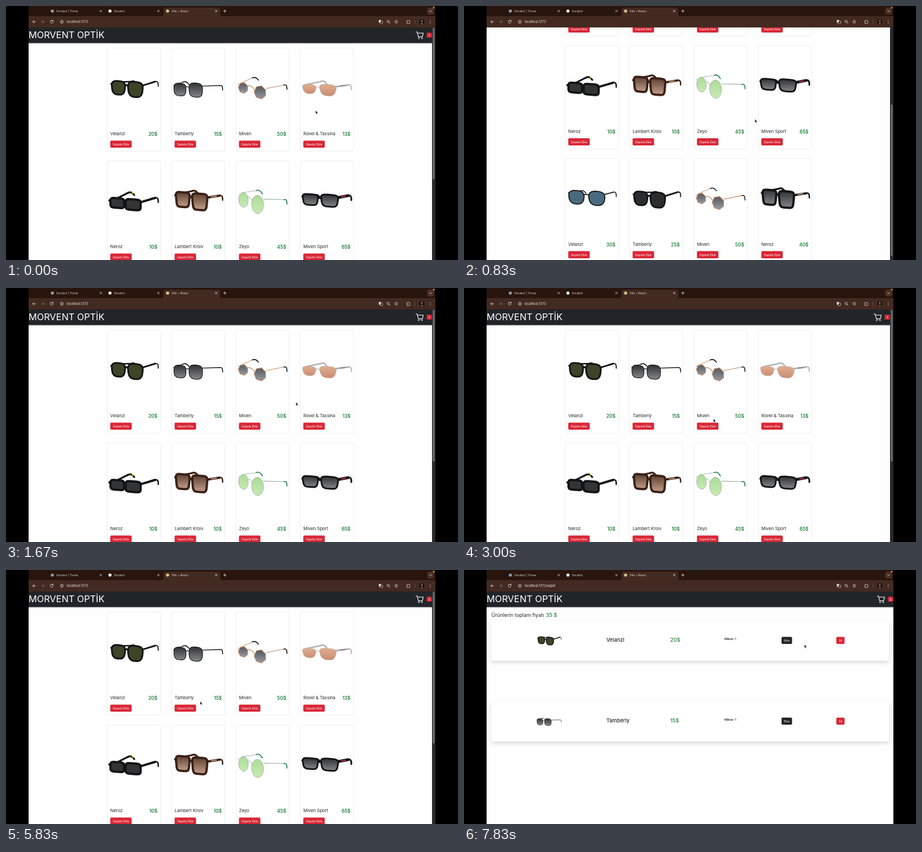
Recreate the animation shown at these times as an HTML page. Size 800 by 450 pixels, loop 8 s.

```html
<!DOCTYPE html>
<html lang="tr">
<head>
<meta charset="utf-8">
<title>Optik</title>
<style>
html, body { margin: 0; width: 100%; height: 100%; overflow: hidden; background: #000; }
svg { display: block; width: 100%; height: 100%; }
text { font-family: Inter, "Open Sans", sans-serif; white-space: pre; }
</style>
</head>
<body>
<svg id="stage" viewBox="0 0 800 450"></svg>
<script>
const GREEN = '#24803f', RED = '#da2737', DARK = '#212529', INK = '#141415', PALE = '#e6dcd6';
const DURATION = 8000;

const path = (d, fill = 'none', stroke = 'none', w = 1) =>
  `<path d="${d}" fill="${fill}" stroke="${stroke}" stroke-width="${w}" stroke-linejoin="round" stroke-linecap="round"/>`;
const line = (d, stroke, w) => path(d, 'none', stroke, w);
const rect = (x, y, w, h, fill, r = 0, extra = '') =>
  `<rect x="${x}" y="${y}" width="${w}" height="${h}" fill="${fill}" rx="${r}" ${extra}/>`;
const dot = (x, y, r, fill, extra = '') =>
  `<circle cx="${x}" cy="${y}" r="${r}" fill="${fill}" ${extra}/>`;
const loop = (x, y, r) => dot(x, y, r, 'none', `stroke="${PALE}" stroke-width=".8"`);
const text = (x, y, size, str, fill = DARK, extra = '') =>
  `<text x="${x}" y="${y}" font-size="${size}" fill="${fill}" ${extra}>${str}</text>`;
const group = (x, y, body, scale = 1) =>
  `<g transform="translate(${x} ${y}) scale(${scale})">${body}</g>`;
const button = (x, y, w, label, fill) => rect(x, y, w, 12.6, fill, 2) +
  text(x + w / 2, y + 8.2, 5.2, label, '#fff', 'text-anchor="middle"');
const gradient = (id, a, b) =>
  `<linearGradient id="${id}" x2="0" y2="1"><stop stop-color="${a}"/><stop offset="1" stop-color="${b}"/></linearGradient>`;

// Superellipse outline: p sets squareness, taper narrows the bottom, n small gives a polygon
function outline(cx, cy, rx, ry, { p, n, taper }) {
  const bend = v => Math.sign(v) * Math.abs(v) ** (2 / p);
  const points = Array.from({ length: n }, (_, i) => {
    const a = (i + .5) / n * Math.PI * 2, v = bend(Math.sin(a));
    const dx = rx * bend(Math.cos(a)) * (1 - taper * v);
    return (cx + dx).toFixed(1) + ' ' + (cy + ry * v + dx * .08).toFixed(1);
  });
  return 'M' + points.join('L') + 'Z';
}

// Glasses seen from the front left: the near lens is an enlarged copy of the far one
function glasses(options) {
  const o = { x: 20, y: 72, rx: 10, ry: 10, dx: 30, dy: 3, grow: 1.13, p: 3, n: 48, taper: .1,
    rim: 3, frame: INK, lens: 'url(#smoke)', arm: 62, thick: 3, back: [40, 57], ...options };
  const { x, y, rx, ry, rim, frame, thick, arm, tip = frame } = o;
  const x2 = x + o.dx, y2 = y + o.dy, rx2 = rx * o.grow, ry2 = ry * o.grow, [bx, by] = o.back;
  const hx = x2 + rx2 + rim / 2, hy = y2 - ry2 * .6, mix = k => `${hx + (85 - hx) * k} ${hy + (arm - hy) * k}`;
  const lens = (cx, cy, w, h) => path(outline(cx, cy, w + rim / 2, h + rim / 2, o), o.lens, frame, rim);
  return line(`M${x - rx * .4} ${y - ry}L${bx} ${by}`, frame, thick * .8) +
    line(`M${bx} ${by}q6 -3 11 ${o.drop || 4}`, tip, Math.max(1.6, thick * .8)) +
    line(`M${hx} ${hy}L85 ${arm}`, frame, thick) +
    line(`M85 ${arm}Q91 ${arm - 2} 90.5 ${arm + 8}`, tip, Math.max(1.5, thick * .6)) +
    (o.accent ? line(`M${mix(.35)}L${mix(.75)}`, o.accent, thick * .4) : '') +
    (o.dab ? dot(bx + 8, by, 1.4, o.dab) : '') +
    line(`M${x - rx} ${y - ry * .7}h${-rim}M${x + rx} ${y - ry * .4}Q${x + o.dx / 2} ${y - ry * .6} ${x2 - rx2} ${y2 - ry2 * .4}`, frame, Math.max(1, rim)) +
    lens(x, y, rx, ry) + lens(x2, y2, rx2, ry2);
}

const classic = { y: 71, ry: 10.5, taper: .12, arm: 60, lens: '#3d4428', back: [42, 60] };
const hexagon = { x: 13, y: 71, rx: 8, ry: 9, dy: 8, grow: 1.25, p: 2, n: 7, taper: 0, rim: 1.2, thick: 1.2,
  frame: '#c08a66', tip: INK, lens: 'url(#ash)', arm: 66, back: [29, 53.5] };
const square = { y: 69, rx: 9.5, ry: 11, dy: 4, p: 5, rim: 4, thick: 4, arm: 62, back: [36, 54], accent: '#d9a77c' };
const goods = [
  ['Velanzi', 20, classic],
  ['Tamberly', 15, { x: 15, y: 74, ry: 10.5, dx: 28, dy: 1, taper: .05, rim: 1.2, thick: 1.3, arm: 67, back: [20, 61] }],
  ['Miven', 50, hexagon],
  ['Rovel &amp; Tassina', 13, { x: 16, y: 73, rx: 11, ry: 8, dx: 33, dy: 2, grow: 1.25, taper: .2, rim: .6,
    frame: '#b4b0b0', lens: 'url(#peach)', arm: 66, back: [36, 60], accent: '#77777d' }],
  ['Neroz', 10, { x: 18, y: 75, ry: 6.5, dx: 28, p: 5, taper: 0, rim: 4, thick: 4, arm: 66, lens: '#333436',
    back: [37, 57], dab: '#d9e431' }],
  ['Lambert Kroiv', 10, { ...square, frame: '#3a2116', lens: 'url(#brown)' }],
  ['Zeyo', 45, { x: 13.5, y: 69.5, rx: 8, ry: 12.5, dx: 25, dy: 8, grow: 1.25, p: 2, taper: 0, rim: .9, thick: 1.1,
    frame: '#9dab9f', tip: '#16794a', lens: 'url(#lime)', arm: 69, back: [36, 53], drop: 6 }],
  ['Miven Sport', 65, { x: 18, y: 69, rx: 11.5, ry: 8, dx: 34, dy: 2, p: 4, taper: .12, arm: 62, thick: 5,
    back: [24, 62], accent: '#c22f3c' }],
  ['Velanzi', 30, { y: 69, rx: 12.5, ry: 11, dx: 36, dy: 2, grow: 1.05, p: 2.6, rim: 1.8, thick: 1.8, arm: 60,
    lens: '#496a7e', back: [26, 58] }],
  ['Tamberly', 25, { ...classic, lens: '#2b2d30' }],
  ['Miven', 50, hexagon],
  ['Neroz', 40, square],
];

const card = ([name, price, look], i) => group(179 + i % 4 * 113.9, 74 + (i >> 2) * 200,
  rect(.3, .3, 94, 183, '#fff', 3, 'stroke="#e4e6e8" stroke-width=".7"') + glasses(look) +
  text(5.6, 154.8, 7.7, name) +
  text(89, 156, 8.3, price + '$', GREEN, 'text-anchor="end" font-weight="600"') +
  button(5.5, 164.5, 38, 'Sepete Ekle', RED));

const wheel = x => dot(x, 57.2, 1.1, 'none', 'stroke="#fff" stroke-width=".8"');
const header = (width, shift, id) =>
  rect(40, 38, width, 27.7, DARK) + rect(40, 65.7, width, 1, '#0003') +
  text(40, 57, 16.3, 'MORVENT OPTİK', '#fff') +
  group(shift, 0, line('M725.5 46h2.2l2.2 8.6h7l1.6 -6.6h-10', '#fff', 1.1) + wheel(730.7) + wheel(736.3) +
    rect(744.5, 47.3, 9.4, 8.8, RED, 1.6) +
    text(749.2, 53.6, 5, '2', '#fff', `id="${id}" text-anchor="middle" font-weight="600"`));

const cartRow = ([name, price, look], i) => group(0, 90 + i * 143,
  rect(48.5, 0, 703.5, 70.5, '#fff', 1, 'filter="url(#shade)"') +
  group(127, -1, glasses(look), .5) +
  text(252, 37, 9.2, name, DARK, 'font-weight="500"') +
  text(365, 37, 9.3, price + '$', GREEN, 'font-weight="500"') +
  text(461, 34, 5.1, 'Miktar: 1', DARK, 'font-weight="600"') +
  button(562, 28.5, 18.6, 'Ekle', DARK) + button(659, 28.5, 14.6, 'Sil', RED));

const tab = (x, label, color) => dot(x, 9, 2.8, color) + text(x + 7, 11, 5.1, label, PALE);
const cross = x => line(`M${x - 1.6} 7.4l3.2 3.2m0 -3.2l-3.2 3.2`, PALE, .8);
const star = Array.from({ length: 10 }, (_, i) => {
  const a = i * Math.PI / 5, r = i % 2 ? 1.5 : 3;
  return `${690.7 + r * Math.sin(a)} ${28 - r * Math.cos(a)}`;
}).join('L');
const chrome =
  rect(40, 0, 720, 20, '#28150d') + rect(40, 18, 720, 20, '#432a20') +
  path('M275 18.5Q279 18 279 14V7Q279 3 283 3H375Q379 3 379 7V14Q379 18 383 18.5Z', '#432a20') +
  tab(82, 'Sorubot | Tivrax', '#8d9aa6') + tab(184, 'Sorubot', '#f2f2f2') + tab(286, 'Vite + React', '#dcc08d') +
  [167.7, 269.7, 372].map(cross).join('') +
  line('M385 9h4.6m-2.3 -2.3v4.6', PALE, .9) +
  rect(745.5, 3, 12, 12, '#4b3025', 3.5) + line('M749.7 8.2l1.9 1.9 1.9 -1.9', PALE, .9) +
  dot(757, 3, 1.4, '#e79a35') +
  line('M52.3 28h-5m2.2 -2.3l-2.3 2.3 2.3 2.3', PALE, .9) +
  line('M62.7 28h5m-2.2 -2.3l2.3 2.3 -2.3 2.3', '#8a7267', .9) +
  line('M83 26.4a2.6 2.6 0 1 0 .3 2.4M83.4 25v1.8h-1.8', PALE, .9) +
  loop(98.8, 28, 2.6) + line('M98.8 27.8v1.4M98.8 26.6v.1', PALE, .8) +
  text(107.3, 30, 5.6, '', '#f1eae6', 'id="url"') +
  rect(659.8, 24.8, 4, 4.8, PALE, .8) +
  rect(662.6, 26.6, 4, 4.8, '#432a20', .8, `stroke="${PALE}" stroke-width=".7"`) +
  loop(676.3, 27.3, 2) + line('M677.8 28.8l2 2', PALE, .9) +
  line(`M${star}Z`, PALE, .7) +
  line('M710 26h1.4q.8 -2 1.7 0h1.5v1.8q1.6 .6 0 1.6v1.6h-4.6Z', PALE, .8) +
  line('M724 24.5v7', '#76594b', .7) +
  rect(732, 24, 8, 8, '#17110f', 1.5) + dot(736, 26.7, 1.4, '#b08d7a') + path('M733.5 32q2.5 -5.5 5 0Z', '#6e625e') +
  [25.8, 28, 30.2].map(y => dot(751, y, .6, PALE)).join('');

stage.innerHTML = `<defs>
  ${gradient('smoke', '#303135', '#85868a')}${gradient('ash', '#55565c', '#9a9aa1')}
  ${gradient('peach', '#dfae92', '#cb8d71')}${gradient('brown', '#5e4032', '#c3a08b')}
  ${gradient('lime', '#acdc9a', '#c6eab4')}
  <clipPath id="view"><rect x="40" y="38" width="720" height="412"/></clipPath>
  <filter id="shade" x="-5%" y="-20%" width="110%" height="160%"><feDropShadow dx="0" dy="3.5" stdDeviation="3.5" flood-opacity=".15"/></filter>
</defs>` + rect(0, 0, 800, 450, '#000') + chrome +
`<g clip-path="url(#view)">${rect(40, 38, 720, 412, '#fefefe')}
  <g id="shop"><g id="list">${header(714, 0, 'badge')}${goods.map(card).join('')}</g>
    ${rect(754, 38, 6, 412, '#29292b')}${rect(755.2, 38.5, 3.6, 269, '#666668', 1.8, 'id="thumb"')}</g>
  <g id="basket">${header(720, 5.8, 'total')}
    ${text(48.5, 83, 8.95, 'Ürünlerin toplam fiyatı')}${text(145, 83, 9.2, '35 $', GREEN, 'font-weight="500"')}
    ${goods.slice(0, 2).map(cartRow).join('')}</g>
</g>
<g id="pointer">${dot(0, 0, 9.4, '#8883', 'id="ring" stroke="#a5a5a5" stroke-width="1.3"')}
  ${path('M0 0V6.1L1.4 4.9 2.4 7 3.4 6.5 2.5 4.5H4.3Z', '#111', '#fff', .5)}</g>`;

// Key points as [time, values...], eased in between
const scroll = [[485, 0], [855, 206], [1335, 206], [1610, 0]];
const cursor = [[400, 548, 185], [670, 515, 200.5], [1900, 513, 202.5], [2170, 495, 213], [2400, 495, 213],
  [3330, 420, 239], [4100, 418, 239], [5050, 321, 243], [5670, 321, 243], [6830, 735.5, 53],
  [7670, 735.5, 53], [7830, 602.5, 132]];

function tween(keys, t) {
  const next = keys.findIndex(k => k[0] > t);
  if (next < 1) return keys.at(next).slice(1);
  const [a, b] = [keys[next - 1], keys[next]], u = (t - a[0]) / (b[0] - a[0]), e = u * u * (3 - 2 * u);
  return a.slice(1).map((v, i) => v + (b[i + 1] - v) * e);
}
const within = (t, a, b) => t >= a && t < b;
const $ = id => document.getElementById(id);
const show = (id, on) => $(id).setAttribute('visibility', on ? 'visible' : 'hidden');
const move = (id, x, y) => $(id).setAttribute('transform', `translate(${x} ${y})`);

function draw(now) {
  const t = Math.floor((now % DURATION + 4) * 6 / 1000) * 1000 / 6 + 1;
  const [y] = tween(scroll, t), inCart = t > 7330;
  move('list', 0, -y);
  move('thumb', 0, y * .665);
  move('pointer', ...tween(cursor, t));
  $('badge').textContent = t < 5330 ? 1 : 2;
  $('url').textContent = 'localhost:5173' + (inCart ? '/sepet' : '');
  show('shop', !inCart);
  show('basket', inCart);
  show('ring', within(t, 5330, 5500) || within(t, 7000, 7330));
  requestAnimationFrame(draw);
}
requestAnimationFrame(draw);
</script>
</body>
</html>
```
